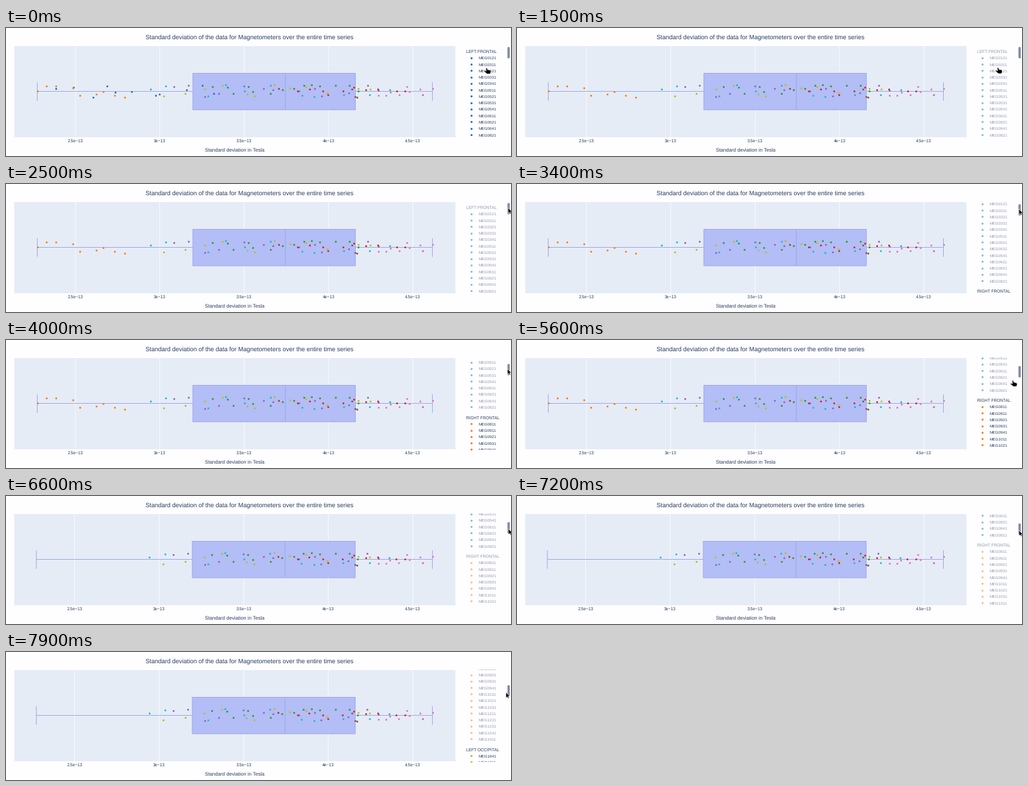
A matplotlib script that plays this animation: 800 by 205 pixels, repeating every 8000 ms.

```python
import numpy as np
import matplotlib.pyplot as plt
from matplotlib.animation import FuncAnimation
from matplotlib.patches import FancyBboxPatch, Polygon, Rectangle

W, H, DPI = 800, 205, 80
STEP, FRAMES = 100, 80
PX = 72 / DPI  # points per pixel
INK, LINE, FILL = "#2a3f5f", "#a0a6ea", "#b3bdf6"
BLUE, ORANGE, GREEN, RED, PURPLE = "#1f77b4", "#ff7f0e", "#2ca02c", "#d62728", "#9467bd"
BROWN, PINK, OLIVE, CYAN = "#8c564b", "#e377c2", "#bcbd22", "#17becf"

HIDE_LEFT, HIDE_RIGHT = 1000, 6000
LOW, Q1, MEDIAN, Q3, HIGH = 49.5, 296, 442.5, 553.5, 675.5
TOP, BOTTOM, MID_Y = 72.5, 131, 101.5
ZOOM = 627.5 / 626  # axis stretch once the lowest group is hidden

plt.rcParams["font.family"] = "Liberation Sans"
plt.rcParams["text.hinting"] = "none"
plt.rcParams["path.snap"] = False

rng = np.random.default_rng(7)
fig = plt.figure(figsize=(W / DPI, H / DPI), dpi=DPI, facecolor="#fefdff")
ax = fig.add_axes([0, 0, 1, 1])
ax.set(xlim=(0, W), ylim=(H, 0))
ax.axis("off")


def label(x, y, text, size, ha="center", **kw):
    return ax.text(x, y, text, fontsize=size * PX, color=INK, ha=ha, va="baseline", **kw)


stretched = []  # artist, resting x values


def line(xs, ys, color, z, width=1):
    artist = ax.plot(xs, ys, color=color, lw=width * PX, zorder=z, solid_capstyle="butt")[0]
    stretched.append((artist, np.array(xs)))


# Plot area
ax.add_patch(Rectangle((13, 29), 699, 146, fc="#e5ecf6", ec="none", zorder=0))
label(385.5, 18, "Standard deviation of the data for Magnetometers over the entire time series", 9.79)
label(362.5, 198.4, "Standard deviation in Tesla", 7.84)

ticks = []
for i in range(5):
    x = 110 + 133.65 * i
    line([x, x], [29, 175], "white", 1, 0.8)
    ticks.append((label(x, 182.6, f"{2.5 + i / 2:g}e\u221213", 6.73), x))

# Box and whiskers
box = ax.add_patch(Rectangle((Q1, TOP), Q3 - Q1, BOTTOM - TOP, fc=FILL, ec=LINE, lw=PX, zorder=2))
line([MEDIAN, MEDIAN], [TOP, BOTTOM], LINE, 3)
for end, quartile in ((LOW, Q1), (HIGH, Q3)):
    line([end, quartile], [MID_Y, MID_Y], LINE, 3)
    line([end, end], [87, 116.5], LINE, 3)


# Sensor readings: evenly spread with jitter, both ends kept in place
def cloud(color, n, lo, hi):
    x = np.linspace(lo, hi, n)
    x[1:-1] += rng.uniform(-0.5, 0.5, n - 2) * (hi - lo) / n
    y = 91 + 22 * rng.beta(0.8, 1.2, n)
    dots = ax.plot(x, y, "o", ms=3 * PX, mfc=color, mec="none", zorder=4)[0]
    stretched.append((dots, x))
    return dots


left_dots = cloud(BLUE, 11, 79, 329)
right_dots = cloud(ORANGE, 9, LOW, 187.5)
cloud(CYAN, 11, 228.5, 607.5)
cloud(OLIVE, 12, 250, 576.5)
cloud(PURPLE, 13, 266, 590)
cloud(GREEN, 14, 327, 557.5)
cloud(RED, 12, 432, 660)
cloud(BROWN, 3, 548, 556)
cloud(PINK, 9, 590, HIGH)

# Legend
GROUPS = [
    ("LEFT FRONTAL", BLUE, "0121 0311 0321 0331 0341 0511 0521 0531 0541 0611 0621 0641 0821"),
    ("RIGHT FRONTAL", ORANGE, "0811 0911 0921 0931 0941 1011 1021 1031 1211 1221 1231 1241 1411"),
    ("LEFT OCCIPITAL", OLIVE, "1641 1711 1721"),
]
ROW, GAP = 10.28, 6.2
window = Rectangle((715, 28), 78, 147.5, transform=ax.transData)
rows = []  # artist, resting y, group


def add_row(artist, y, group):
    artist.set_clip_path(window)
    rows.append((artist, y, group))


y = 37.4
for g, (title, color, codes) in enumerate(GROUPS):
    add_row(label(729, 0, title, 6.6, "left", clip_on=True), y + 2.6, g)
    for code in codes.split():
        y += ROW
        add_row(label(748.4, 0, "MEG" + code, 6.35, "left", clip_on=True), y + 2.5, g)
        add_row(ax.plot([737], [0], "o", ms=3.2 * PX, mfc=color, mec="none")[0], y, g)
    y += ROW + GAP

bar = ax.add_patch(FancyBboxPatch((796, 32), 0.4, 15, boxstyle="round,pad=1.6,rounding_size=1.6",
                                  fc="#808ba4", ec="none", zorder=5))

# Mouse pointer
ARROW = np.array([(0, 0), (0, 9), (2, 7.2), (3.4, 10), (4.8, 9.4), (3.5, 6.7), (6, 6.5)])
HAND = np.array([(0, 0), (1.8, 0), (2.6, 2.8), (7, 3.6), (7.8, 6), (6.8, 9.4), (1.6, 9.4),
                 (-3, 5.2), (-2, 4.2), (0.6, 5)])
pointer = ax.add_patch(Polygon(ARROW, fc="black", ec="white", lw=0.5 * PX, zorder=9))

# start, end, then the value reached
POINTER_MOVES = [
    (1400, 2200, (795.5, 38)),   # to the scrollbar
    (2800, 4200, (794, 49)),     # drag
    (4200, 4500, (760.3, 113)),  # to the second group
    (5100, 5600, (784.5, 65)),
    (5600, 5900, (796, 52.5)),   # back to the scrollbar
    (6800, 7700, (792, 64.5)),   # drag
]
SCROLL_MOVES = [(2800, 4200, 86.5), (4600, 4800, 91), (6800, 7700, 181.8)]


def tween(t, value, moves):
    """Follow the moves up to time t, each one easing in."""
    value = np.array(value, float)
    for start, end, goal in moves:
        p = np.clip((t - start) / (end - start), 0, 1)
        value = value + (np.array(goal) - value) * p**2
    return value


def draw(i):
    t = i * STEP
    hidden = (t >= HIDE_LEFT, t >= HIDE_RIGHT, False)
    left_dots.set_visible(not hidden[0])
    right_dots.set_visible(not hidden[1])

    def fit(x):
        return HIGH - (HIGH - x) * (ZOOM if hidden[1] else 1)

    for artist, x in stretched:
        artist.set_xdata(fit(x))
    for tick, x in ticks:
        tick.set_x(fit(x))
    box.set_x(fit(Q1))
    box.set_width(fit(Q3) - fit(Q1))

    offset = tween(t, 0, SCROLL_MOVES)
    for artist, y, g in rows:
        y = y - offset
        artist.set_visible(20 < y < 185)
        artist.set_alpha(0.5 if hidden[g] else 1)
        if hasattr(artist, "set_ydata"):
            artist.set_ydata([y])
        else:
            artist.set_y(y)
    bar.set_y(32 + offset / 8)

    spot = tween(t, (760.3, 64), POINTER_MOVES)
    pointer.set_xy((ARROW if spot[0] > 788 else HAND) + spot)
    return []


anim = FuncAnimation(fig, draw, frames=FRAMES, interval=STEP, repeat=True, repeat_delay=0,
                     init_func=lambda: draw(0))
plt.show()
```
